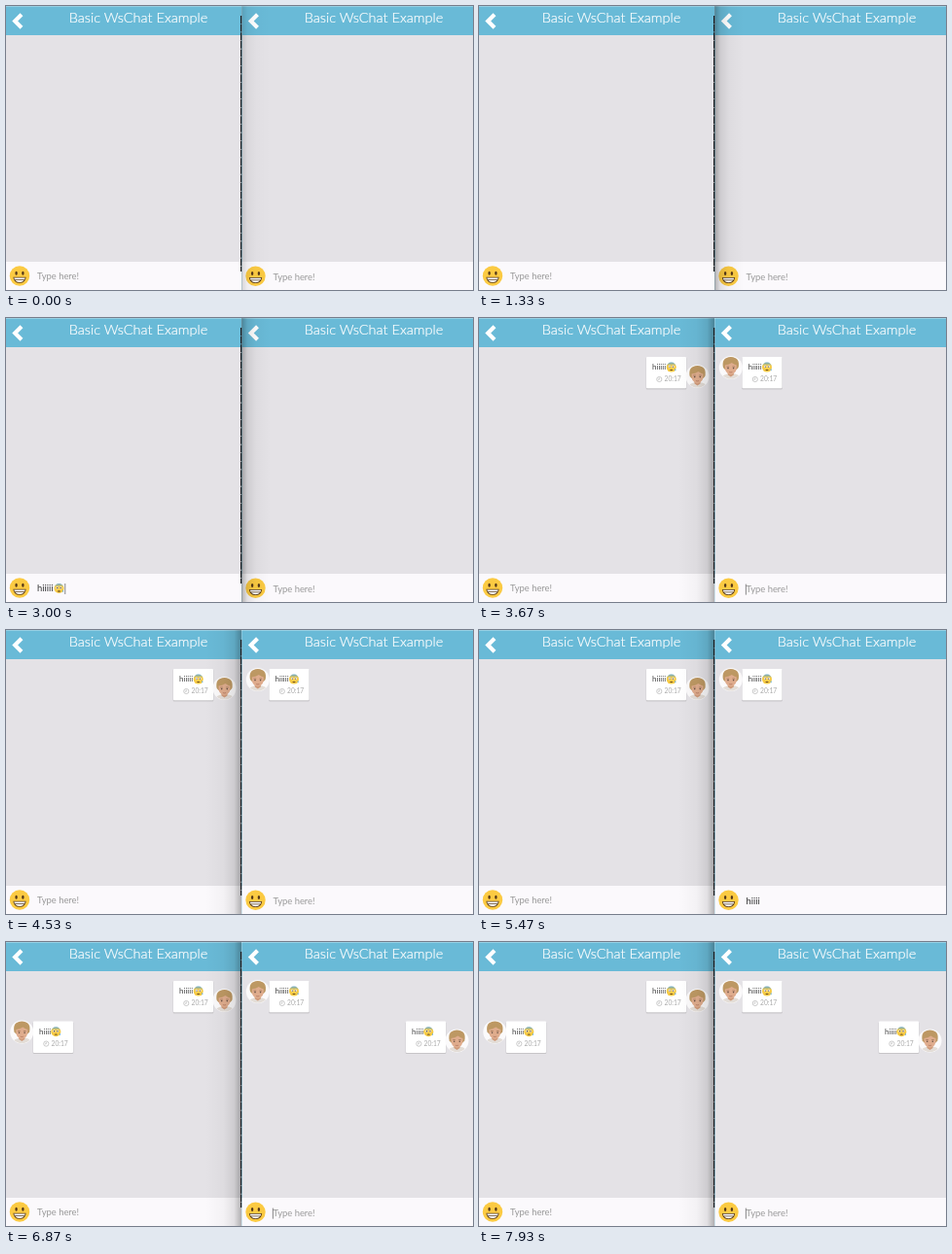
These frames come from a looping animation (480x292 px, 8 s). An HTML page:

```html
<!DOCTYPE html>
<html lang="en">
<head>
<meta charset="utf-8">
<title>Chat example</title>
<style>
  html, body { margin: 0; width: 100%; height: 100%; overflow: hidden; background: #e4e2e6; }
  svg { display: block; width: 100vw; height: 100vh; }
  text { font-family: Lato, "Open Sans", sans-serif; white-space: pre; }
  .title { font-size: 14.55px; font-weight: 300; fill: #fff; stroke: #fff; stroke-width: .22; text-anchor: middle; }
  .input { font-size: 9.4px; }
  .msg { font-size: 8px; fill: #444; }
  .time { font-size: 6.7px; fill: #aaa; }
</style>
</head>
<body>
<svg viewBox="0 0 480 292">
  <defs>
    <linearGradient id="toRight">
      <stop offset="0" stop-color="#000" stop-opacity="0"/>
      <stop offset=".5" stop-color="#000" stop-opacity=".03"/>
      <stop offset=".8" stop-color="#000" stop-opacity=".1"/>
      <stop offset="1" stop-color="#000" stop-opacity=".3"/>
    </linearGradient>
    <linearGradient id="toLeft" href="#toRight" x1="1" x2="0"/>
    <linearGradient id="cold" x2="0" y2="1">
      <stop offset="0" stop-color="#6aa8c8"/>
      <stop offset=".36" stop-color="#f6ca45"/>
    </linearGradient>
    <clipPath id="disc"><circle r="11.5"/></clipPath>
    <g id="grin">
      <circle r="10.2" fill="#fbca42"/>
      <ellipse cx="-3.4" cy="-2.7" rx="1.2" ry="2" fill="#553819"/>
      <ellipse cx="3.4" cy="-2.7" rx="1.2" ry="2" fill="#553819"/>
      <path d="M-6.6 1.2H6.6Q6 7.2 0 7.2T-6.6 1.2Z" fill="#553819"/>
      <path d="M-5.7 2H5.7L5.1 3.7H-5.1ZM-4.6 4.5H4.6Q3 6.4 0 6.4T-4.6 4.5Z" fill="#fff"/>
    </g>
    <g id="worry">
      <circle r="5" fill="url(#cold)"/>
      <circle cx="-1.8" cy="-.6" r="1.2" fill="#fff"/>
      <circle cx="1.8" cy="-.6" r="1.2" fill="#fff"/>
      <circle cx="-1.7" cy="-.5" r=".7" fill="#46341f"/>
      <circle cx="1.7" cy="-.5" r=".7" fill="#46341f"/>
      <path d="M-1.8 3.4Q0 1.2 1.8 3.4Z" fill="#553819"/>
      <path d="M4 1.2Q5.4 3.3 4.2 3.9Q3 3.4 4 1.2Z" fill="#58a8df"/>
    </g>
    <g id="avatar">
      <circle r="12" fill="#fbfafb"/>
      <g clip-path="url(#disc)">
        <path d="M-10 12Q-9 6.5 0 6T10 12Z" fill="#e3ddd7"/>
        <path d="M-3 4H3V7.5L0 9.5L-3 7.5Z" fill="#cf9a7a"/>
        <path d="M-7.8 0Q-10-10.5 0-11Q10-10.5 7.8 0L6 2H-6Z" fill="#bd9863"/>
        <path d="M-6-2.5Q-2-2.8 1-5Q4-3 6-2.5Q6.6 6.6 0 7.2Q-6.6 6.6-6-2.5Z" fill="#dfac8d"/>
        <path d="M-4.3-1H-1.6M1.6-1H4.3" stroke="#8b6749" stroke-width=".6"/>
        <circle cx="-2.8" cy=".6" r=".8" fill="#665044"/>
        <circle cx="2.8" cy=".6" r=".8" fill="#665044"/>
        <path d="M-1.6 4.6Q0 5.2 1.6 4.6" fill="none" stroke="#ad705a" stroke-width=".7"/>
      </g>
    </g>
  </defs>
  <g id="stage"></g>
</svg>
<script>
const LOOP = 8000;
const stage = document.getElementById('stage');

// Each window: place, focus time, key strokes, emoji and send times.
const windows = [
  { x: 0, w: 242, dy: 0, focus: 400, blur: 3600, word: 'hiiiii', start: 1870, gap: 90, emoji: 2870, send: 3130 },
  { x: 242.5, w: 238, dy: .6, focus: 3600, blur: LOOP, word: 'hiiii', start: 4540, gap: 90, emoji: 5900, send: 6500 }
];

const bubble = (x, y, own, word, emojiX) => `
  <rect x="${x - .3}" y="${y + .8}" width="41.6" height="32.6" rx="1" fill="#000" opacity=".13"/>
  <rect x="${x}" y="${y}" width="41" height="32.3" rx="1" fill="#fff"/>
  <text class="msg" x="${x + 6}" y="${y + 13.4}">${word}</text>
  <use href="#worry" x="${x + emojiX}" y="${y + 10.6}"/>
  <g fill="none" stroke="#aaa" stroke-width=".6">
    <circle cx="${x + 13.3}" cy="${y + 23}" r="2.6"/>
    <path d="M${x + 13.3} ${y + 21.4}v1.8h-1.3"/>
  </g>
  <text class="time" x="${x + 18.5}" y="${y + 25.4}">20:17</text>
  <use href="#avatar" x="${x + (own ? 52.5 : -11.7)}" y="${y + (own ? 20 : 11)}"/>`;

const panel = ({ x, w, dy }, i) => `
  <rect x="${x}" width="${w}" height="292" fill="#e4e2e6"/>
  <rect x="${x}" width="${w}" height="30" fill="#69bad7"/>
  <path d="M${x + 16} 8.8L${x + 9.2} 15.5L${x + 16} 22.2" fill="none" stroke="#fff" stroke-width="4.1"/>
  <text class="title" x="${Math.floor(x) + 136}" y="17">Basic WsChat Example</text>
  <rect x="${x}" y="263" width="${w}" height="30" fill="#fbf9fc"/>
  <use href="#grin" x="${x + 14}" y="${277.5 + dy * .5}"/>
  <text class="input" id="input${i}" x="${x + 32}" y="${281.4 + dy}"></text>
  <use id="emoji${i}" href="#worry" y="${278 + dy}"/>
  <rect id="caret${i}" y="${273 + dy}" width=".7" height="11" fill="#555"/>`;

stage.innerHTML = `
  <rect width="480" height="292" fill="#69bad7"/>
  ${windows.map(panel).join('')}
  <rect width="480" height=".6" fill="#fff" opacity=".5"/>
  <g id="first">${bubble(172, 40, true, 'hiiiii', 25.7)}${bubble(270.5, 40, false, 'hiiiii', 25.5)}</g>
  <g id="second">${bubble(28, 81.6, false, 'hiiii', 23.3)}${bubble(411, 81.6, true, 'hiiii', 23.3)}</g>
  <rect id="leftShade" x="205" width="37" height="292" fill="url(#toRight)"/>
  <rect id="rightShade" x="242" width="30" height="292" fill="url(#toLeft)"/>
  <path d="M241.6 10V273" stroke="#16171a" stroke-width="1.2" stroke-dasharray="8 .6"/>`;

const el = id => document.getElementById(id);
const show = (id, on) => el(id).setAttribute('visibility', on ? 'visible' : 'hidden');

function drawInput(win, i, t) {
  const sent = t >= win.send;
  const count = sent ? 0 : Math.max(0, Math.min(win.word.length, Math.floor((t - win.start) / win.gap) + 1));
  const hasEmoji = !sent && t >= win.emoji;
  const input = el('input' + i);
  input.textContent = count ? win.word.slice(0, count) : 'Type here!';
  input.setAttribute('fill', count ? '#333' : '#999');

  const end = win.x + 32 + (count ? input.getComputedTextLength() : -.6);
  el('emoji' + i).setAttribute('x', end + 6);
  show('emoji' + i, hasEmoji);

  // The caret restarts its blink after every edit.
  const lastKey = win.start + (count - 1) * win.gap;
  const since = sent ? win.send : hasEmoji ? win.emoji : count ? lastKey : win.focus;
  const focused = t >= win.focus && t < win.blur;
  el('caret' + i).setAttribute('x', end + (hasEmoji ? 12 : 0));
  show('caret' + i, focused && (t - since) % 1000 < 500);
}

function draw(t) {
  const [left, right] = windows;
  windows.forEach((win, i) => drawInput(win, i, t));
  show('first', t >= left.send);
  show('second', t >= right.send);
  show('leftShade', t >= right.focus);
  show('rightShade', t < right.focus);
  el('rightShade').setAttribute('opacity', t < left.focus ? .5 : 1);
}

const began = performance.now();
function tick() {
  draw((performance.now() - began) % LOOP);
  requestAnimationFrame(tick);
}
tick();
</script>
</body>
</html>
```
